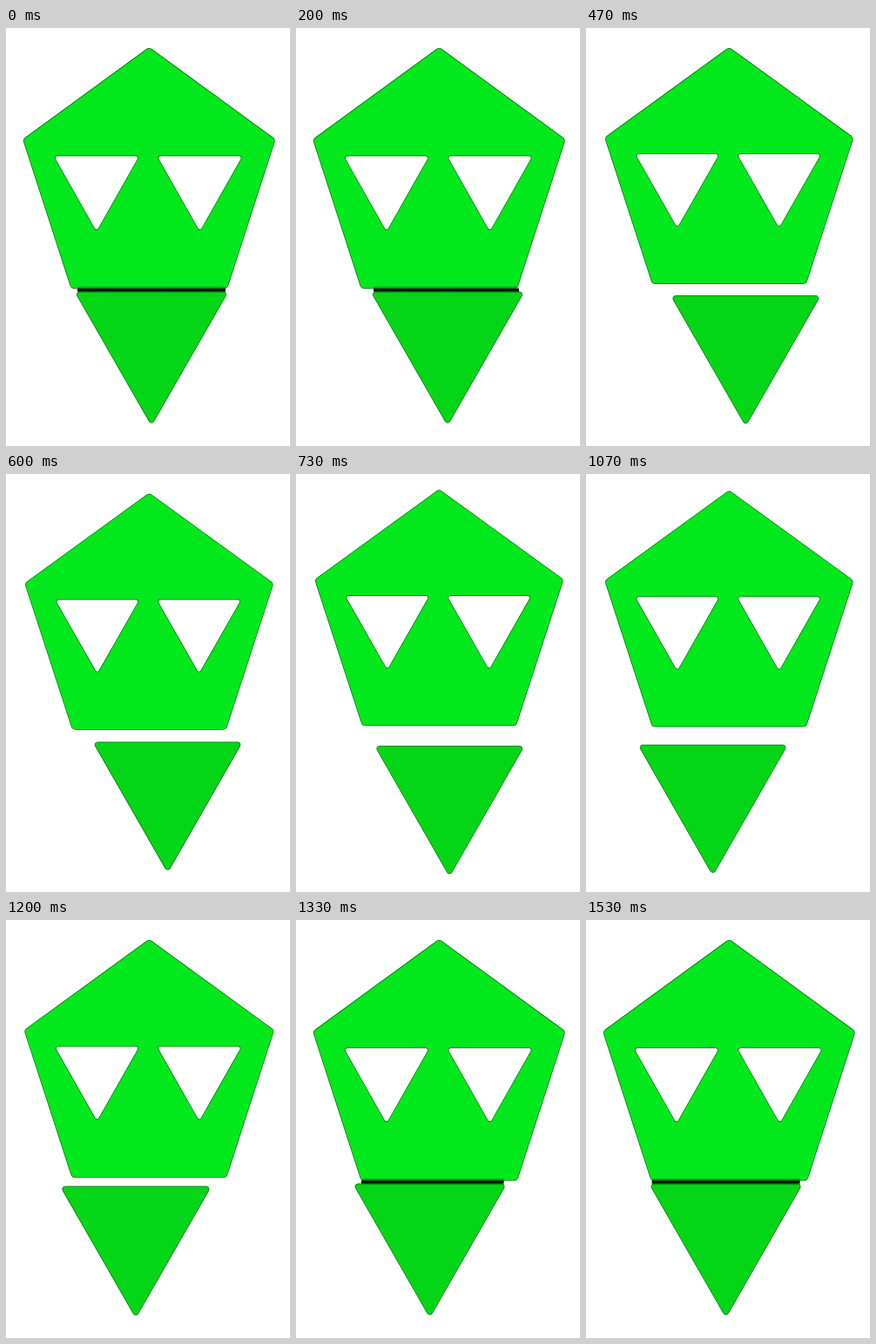
Animation, 326 px wide and 480 px high, one loop 1590 ms. Source, as an HTML page without scripts:

```html
<!DOCTYPE html>
<html lang="en">
<head>
<meta charset="utf-8">
<title>Chewing mask</title>
<style>
  @property --n { syntax: "<number>"; inherits: true; initial-value: 0; }

  html, body { margin: 0; width: 100%; height: 100%; overflow: hidden; background: #fff; }

  /* --n counts 24 held poses; every movement is derived from it */
  svg {
    display: block; width: 326px; height: 480px;
    animation: count 1590ms steps(24) -3ms infinite;
    --open: calc((1 + cos(37deg * clamp(-4.86, var(--n) - 13.27, 4.86))) / 2);
    --press: calc(clamp(0, (7 - var(--n)) / 3, 1) + clamp(0, (var(--n) - 17) / 3, 1));
    --slide: calc(167px + 2.33px * var(--n) - 30px * (1 - cos(20deg * clamp(0, var(--n) - 7.85, 9))));
  }
  @keyframes count { from { --n: 0; } to { --n: 24; } }

  .head {
    transform-origin: 164.3px 23.3px;
    transform: translateY(calc(-8.5px * var(--open)))
      scale(calc(1 + .015 * var(--press)), calc(1 + .02 * var(--press)));
  }
  .jaw {
    transform-origin: 0 454px;
    transform: translate(var(--slide), calc(9px * var(--open) - .7px * var(--press)))
      scale(calc(1 + .026 * var(--press)));
  }
  .crease {
    transform: translateX(var(--slide));
    opacity: clamp(0, 3 * var(--press) - 2, 1);
  }

  .edge, .face, .chin, .hole {
    stroke-linejoin: round; stroke-width: var(--w); fill: var(--c); stroke: var(--c);
  }
  .edge { --c: #056a10; }
  .face { --c: #01e81c; --w: 9px; }
  .chin { --c: #03d616; --w: 6px; }
  .hole { --c: #fff; --w: 4.4px; }
  .face-edge { --w: 10.4px; }
  .chin-edge { --w: 7.4px; }
  .hole-edge { --w: 5.8px; }
</style>
</head>
<body>
<svg viewBox="0 0 326 480">
  <defs>
    <polygon id="pentagon" points="164.3,28.3 301.3,127.8 249,288.8 79.7,288.8 27.3,127.8"/>
    <polygon id="wedge" points="-80,310.8 80,310.8 0,450.5"/>
    <polygon id="socket" points="-44.3,146.9 44.3,146.9 0,224.8"/>
    <g id="eye">
      <use href="#socket" class="edge hole-edge"/>
      <use href="#socket" class="hole"/>
    </g>
    <linearGradient id="shade" x2="0" y2="1">
      <stop offset="0" stop-color="#010" stop-opacity="0"/>
      <stop offset=".3" stop-color="#010" stop-opacity=".3"/>
      <stop offset=".5" stop-color="#010"/>
      <stop offset=".74" stop-color="#010"/>
      <stop offset="1" stop-color="#010" stop-opacity="0"/>
    </linearGradient>
    <clipPath id="chinline"><rect x="75" y="290" width="181" height="20"/></clipPath>
  </defs>

  <g class="head">
    <use href="#pentagon" class="edge face-edge"/>
    <use href="#pentagon" class="face"/>
    <use href="#eye" x="104.8"/>
    <use href="#eye" x="221.6"/>
  </g>

  <g class="jaw">
    <use href="#wedge" class="edge chin-edge"/>
    <use href="#wedge" class="chin"/>
  </g>

  <g clip-path="url(#chinline)">
    <rect class="crease" x="-85" y="296" width="170" height="8" fill="url(#shade)"/>
  </g>
</svg>
</body>
</html>
```
